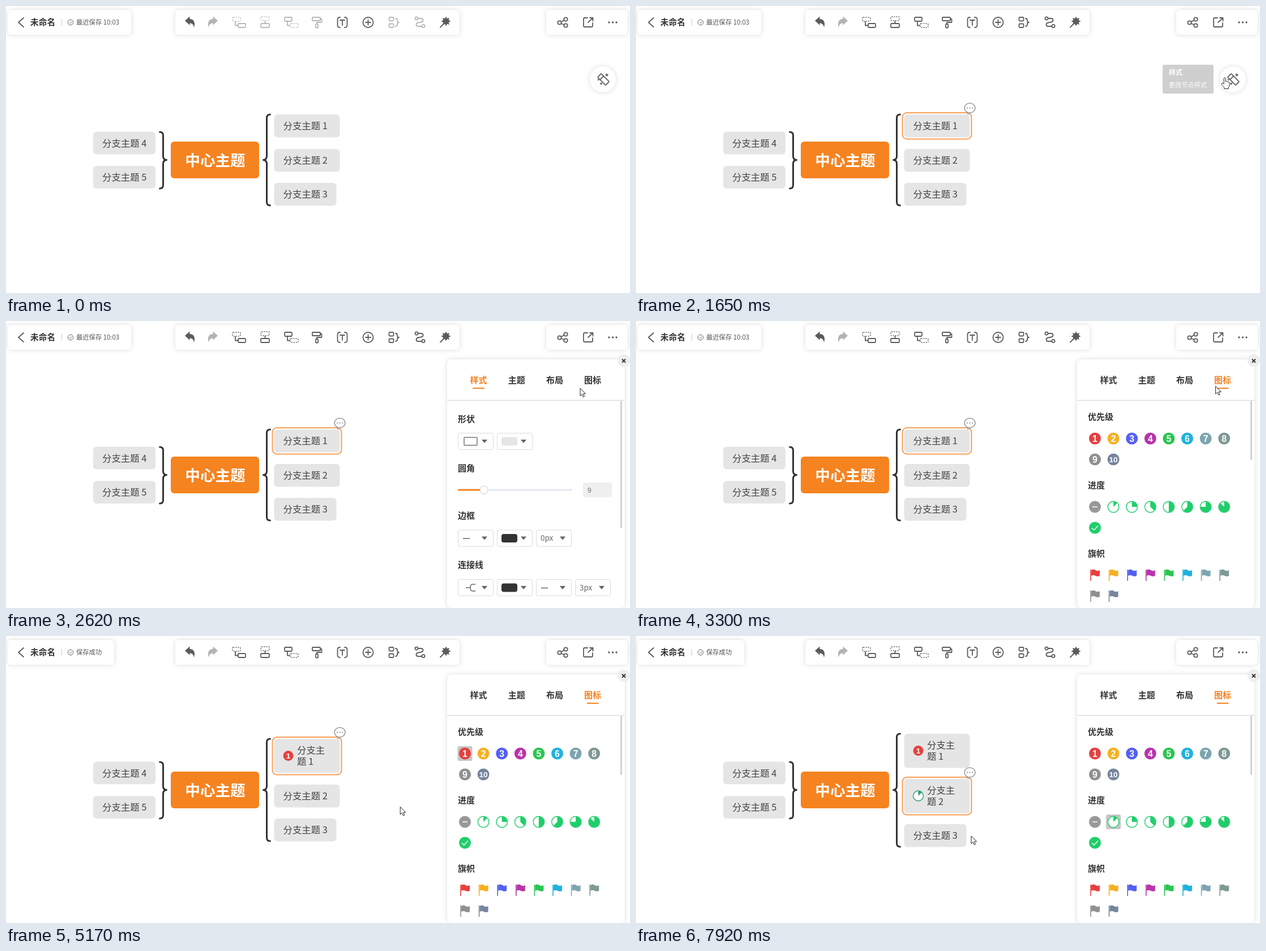
An HTML page that plays this animation: 1102x508 px, repeating every 7.99 s.

```html
<!DOCTYPE html>
<html lang="zh-CN">
<head>
<meta charset="utf-8">
<title>思维导图</title>
<style>
  html, body { margin: 0; width: 100%; height: 100%; overflow: hidden; background: #fff; }
  svg { display: block; font-family: "Noto Sans CJK SC", "Noto Sans CJK", sans-serif; }
  .card { fill: #fff; filter: drop-shadow(0 0 4px rgba(0, 0, 0, .14)); }
  .ico { fill: none; stroke: #5c5c5c; stroke-width: 1.8; stroke-linejoin: round; stroke-linecap: round; }
  .ico .dash { stroke-dasharray: 2 2; stroke-width: 1.5; stroke-linecap: butt; }
  .ico .solid { fill: #5c5c5c; stroke: none; }
  .idle .need { stroke: #b8b8b8; }
  .brace { fill: none; stroke: #333; stroke-width: 3; stroke-linecap: round; stroke-linejoin: round; }
  .num { font-family: "Liberation Sans", Arial, sans-serif; }
  .light { font-family: "Noto Sans CJK SC Light", "Noto Sans CJK SC DemiLight", "Noto Sans CJK SC", sans-serif; }
  .select { fill: #fff; stroke: #dcdcdc; }
</style>
</head>
<body>
<svg id="stage" width="1102" height="508" viewBox="0 0 1102 508"></svg>
<script>
const LOOP = 7990;
const ORANGE = '#f58320', GREEN = '#1fce6a';
const HUES = ['#e6403f', '#f6b021', '#5460f5', '#b834ab', '#2bc552', '#1fb2de',
              '#7ca5b0', '#7f9995', '#8f9191', '#75859d'];

// ---- drawing helpers ----
const text = (x, cy, size, str, fill = '#333', weight = 400, anchor = 'start', cls = '') =>
  `<text x="${x}" y="${cy + size * .37}" font-size="${size}" fill="${fill}" font-weight="${weight}" text-anchor="${anchor}" class="${cls}">${str}</text>`;
const rect = (x, y, w, h, r, attrs = '') =>
  `<rect x="${x}" y="${y}" width="${w}" height="${h}" rx="${r}" ${attrs}/>`;
const circle = (x, y, r, attrs = '') => `<circle cx="${x}" cy="${y}" r="${r}" ${attrs}/>`;
const path = (d, attrs = '') => `<path d="${d}" ${attrs}/>`;
const group = (id, body, attrs = '') => `<g id="${id}" ${attrs}>${body}</g>`;
const card = (x, w, id = 'bar' + x) => rect(x, 7, w, 44, 6, `class="card" id="${id}"`);

function star(x, y, r, points = 5, inner = .45) {
  const pts = [];
  for (let i = 0; i < points * 2; i++) {
    const a = i * Math.PI / points - Math.PI / 2, d = i % 2 ? r * inner : r;
    pts.push((x + d * Math.cos(a)).toFixed(1) + ' ' + (y + d * Math.sin(a)).toFixed(1));
  }
  return path('M' + pts.join('L') + 'Z', 'class="solid"');
}

function pie(x, y, r, eighths, color) {
  const a = eighths * Math.PI / 4, k = r - .5;
  return circle(x, y, r, `fill="#fff" stroke="${color}" stroke-width="1.4"`) +
    path(`M${x} ${y}V${y - k}A${k} ${k} 0 ${eighths > 4 ? 1 : 0} 1 ${x + k * Math.sin(a)} ${y - k * Math.cos(a)}Z`, `fill="${color}"`);
}

const badge = (x, y, r, n) => circle(x, y, r, `fill="${HUES[n - 1]}"`) +
  text(x, y, n > 9 ? r * 1.3 : r * 1.5, n, '#fff', 700, 'middle', 'num');

// side: 1 opens right, -1 opens left
function brace(x, top, bottom, side) {
  const e = 6 * side;
  return path(`M${x + e} ${top}Q${x} ${top} ${x} ${top + 6}V266Q${x} 272 ${x - e} 272.5Q${x} 273 ${x} 279V${bottom - 6}Q${x} ${bottom} ${x + e} ${bottom}`, 'class="brace"');
}

const box = (x, y, w, h) => rect(x, y, w, h, 6, 'fill="#e5e5e5"');
const label = (x, cy, str) => text(x, cy, 16.4, str, '#444', 300, 'start', 'light');

// ---- top bars ----
function topBar() {
  const undo = 'M316 26L324.500 18.500V23C331.500 23 335 29 332 38C331 32.500 329 30.500 324.500 30.500V34Z';
  const need = body => `<g class="need">${body}</g>`;
  const dashed = (x, y, w = 14) => rect(x, y, w, 7, 1.5, 'class="dash"');
  const solid = (x, y, w = 13) => rect(x, y, w, 7, 1.5);
  return card(3, 218, 'fileCard') +
    path('M31 21L22 29L31 37', 'class="ico"') +
    text(43, 28.5, 14.7, '未命名', '#333', 700) +
    path('M98.500 23V35', 'stroke="#ccc"') +
    circle(114, 29, 4.8, 'fill="none" stroke="#666"') +
    path('M111.700 29L113.500 30.800L116.500 27.500', 'fill="none" stroke="#666"') +
    group('saved0', text(124, 29, 11.3, '最近保存 10:03', '#555')) +
    group('saved1', text(124, 29, 11.3, '保存成功', '#555')) +
    card(299, 502) +
    path(undo, 'fill="#5c5c5c"') +
    path(undo, 'fill="#b3b3b3" transform="translate(690 0) scale(-1 1)"') +
    group('tools',
      need(dashed(400, 20) + solid(410, 31) + path('M405 28V34.500H409')) +
      need(dashed(450, 19, 15) + solid(450, 31, 15) + path('M457.500 27V30')) +
      need(solid(492, 20) + dashed(502, 31) + path('M497 28V34.500H501')) +
      need(rect(541, 20, 14, 6, 1) + path('M555 23H557.500V29H549V32') + rect(547, 32, 4, 6.5, 1)) +
      path('M590 20Q585.500 20 585.500 24V34Q585.500 38 590 38M598 20Q602.500 20 602.500 24V34Q602.500 38 598 38M590 25H598M594 25V34') +
      circle(639.5, 29, 9) + path('M635 29H644M639.500 24.500V33.500') +
      need(rect(676.5, 20, 8, 6.5, 1.5) + rect(676.5, 31.5, 8, 6.5, 1.5) + path('M688 22Q691 22 691 25.500Q691 29 694 29Q691 29 691 32.500Q691 36 688 36')) +
      need(circle(725, 22, 2.6) + circle(737, 35.5, 2.6) + path('M728 22H733Q736.500 22 736.500 25Q736.500 28 733 28.500L728 29.500Q724.500 30 724.500 33Q724.500 36 728 36H734')) +
      star(777, 27, 8.5, 8, .6) + path('M773 31.500L767 37.500'), 'class="ico"') +
    card(954, 144) +
    group('actions',
      circle(977.5, 29.5, 3.2) + circle(988.5, 23.5, 3.2) + circle(988.5, 34.5, 3.2) +
      path('M980.500 28L985.500 25M980.500 31L985.500 33') +
      path('M1027 21H1022Q1020 21 1020 23V35Q1020 37 1022 37H1034Q1036 37 1036 35V30M1031 21H1036.500V26.500M1036 21.500L1028 29') +
      [1065, 1071.5, 1078].map(x => circle(x, 29, 1.7, 'class="solid"')).join(''), 'class="ico"');
}

// ---- mind map; layout 0 plain, 1 first topic tagged, 2 second tagged too ----
const ROWS = [
  [[192, 40], [253, 40], [313, 40]],
  [[182, 60], [263, 40], [323, 40]],
  [[173, 60], [253, 60], [333, 40]]
];
function branches(layout) {
  const rows = ROWS[layout];
  let out = brace(460.5, rows[0][0], rows[2][0] + 40, 1);
  rows.forEach(([y, h], i) => {
    const cy = y + h / 2;
    out += box(473.5, y, i < 2 ? 116 : 110, h + .5);
    if (h === 40) return out += label(489.5, cy, `分支主题 ${i + 1}`);
    out += label(514, cy - 10, '分支主') + label(514, cy + 10, `题 ${i + 1}`);
    out += i ? pie(498.5, cy, 9, 1, '#2b9c7b') : badge(498.5, cy, 9, 1);
  });
  return out;
}
function outline(layout, i) {
  const [y, h] = ROWS[layout][i];
  const cy = y - 11.5;
  return rect(470.5, y - 3, 122, h + 6.5, 8, 'fill="none" stroke="#fa9d55" stroke-width="2"') +
    path(`M584 ${cy + 7}L586.500 ${cy + 11}L591 ${cy + 8}`, 'fill="#fff" stroke="#999" stroke-width="1.500"') +
    `<ellipse cx="589.500" cy="${cy}" rx="9.500" ry="8.500" fill="#fff" stroke="#999" stroke-width="1.600"/>` +
    [585, 589.5, 594].map(x => circle(x, cy, 1.1, 'fill="#888"')).join('');
}
const trunk = () =>
  box(154, 222.5, 110, 40) + box(154, 283, 110, 40) +
  label(170, 242.5, '分支主题 4') + label(170, 303, '分支主题 5') +
  brace(277.5, 223, 323, -1) + rect(291, 240, 156, 65, 6, `fill="${ORANGE}"`) +
  text(369.5, 273, 26.6, '中心主题', '#fff', 700, 'middle');

// ---- side panel ----
const TABS = ['样式', '主题', '布局', '图标'];
const cellX = i => 810.5 + 32.6 * (i % 8);
const heading = (cy, str) => text(798, cy, 15, str, '#333', 600);

function dropdown(x, cy, body) {
  return rect(x + .5, cy - 14.5, 62, 29, 3, 'class="select"') + body(x, cy) +
    path(`M${x + 42} ${cy - 3}H${x + 52}L${x + 47} ${cy + 3}Z`, 'fill="#606266"');
}
const swatch = color => (x, cy) => rect(x + 8, cy - 7.5, 28, 15, 4, `fill="${color}"`);
const line = (x, cy) => path(`M${x + 9} ${cy + .5}H${x + 21}`, 'stroke="#666" stroke-width="1.500"');
const px = n => (x, cy) => text(x + 8, cy, 13.5, n + 'px', '#666');
const frame = (x, cy) => rect(x + 11, cy - 7, 23, 14, 1, 'fill="none" stroke="#777" stroke-width="1.500"');
const link = (x, cy) => path(`M${x + 14} ${cy}H${x + 21}M${x + 31} ${cy - 6}H${x + 26}Q${x + 22} ${cy - 6} ${x + 22} ${cy}Q${x + 22} ${cy + 6} ${x + 26} ${cy + 6}H${x + 31}`, 'fill="none" stroke="#666" stroke-width="1.500"');
const dropdowns = (cy, list) => list.map((b, i) => dropdown(798 + 69 * i, cy, b)).join('');
const scroll = h => rect(1085, 141, 3, h, 1.5, 'fill="#d2d2d2"');

const stylePage = () =>
  heading(173, '形状') + dropdowns(213, [frame, swatch('#e5e5e5')]) +
  heading(260, '圆角') +
  rect(798, 297.5, 202, 3, 1.5, 'fill="#e4e7ed"') + rect(798, 297.5, 46, 3, 1.5, `fill="${ORANGE}"`) +
  circle(844, 299, 7, 'fill="#fff" stroke="#ccc"') +
  rect(1019, 286, 51, 26, 3, 'fill="#efefef"') + text(1027, 299.5, 12, '9', '#666') +
  heading(344, '边框') + dropdowns(384.5, [line, swatch('#333'), px(0)]) +
  heading(431, '连接线') + dropdowns(472, [link, swatch('#333'), line, px(3)]) + scroll(226);

function flag(x, y, color) {
  return path(`M${x - 7.5} ${y - 9}V${y + 11}`, `stroke="${color}" stroke-width="1.600"`) +
    path(`M${x - 6.5} ${y - 8}Q${x - 2.5} ${y - 10.5} ${x + 1} ${y - 8}T${x + 8.5} ${y - 8}V${y + 2}Q${x + 5} ${y + 4} ${x + 1} ${y + 2}T${x - 6.5} ${y + 2}Z`, `fill="${color}"`);
}
function iconPage() {
  let out = heading(169, '优先级') + heading(290, '进度') + heading(411, '旗帜') + scroll(105);
  out += rect(0, 0, 26, 26, 3, 'id="mark" fill="#c6c6c6"') + rect(0, 0, 26, 26, 3, 'id="hover" fill="#e3e3e3"');
  HUES.forEach((c, i) => {
    const low = i > 7 ? 37 : 0;
    out += badge(cellX(i), 208 + low, 10.5, i + 1) + flag(cellX(i), 449 + low, c);
  });
  out += circle(810.5, 329, 10.5, 'fill="#999"') + path('M806 329H815', 'stroke="#fff" stroke-width="1.500"');
  for (let i = 1; i < 8; i++) out += pie(cellX(i), 329, 9.8, i, GREEN);
  return out + circle(810.5, 366, 10.5, `fill="${GREEN}"`) +
    path('M805 366.500L809 370L816 362.500', 'fill="none" stroke="#fff" stroke-width="1.500"');
}
const tabBar = active => TABS.map((name, i) => {
  const x = 834.5 + 67.2 * i, on = i === active;
  return text(x, 104, 15, name, on ? ORANGE : '#333', 600, 'middle') +
    (on ? rect(x - 10.5, 118, 21, 2, 1, `fill="${ORANGE}"`) : '');
}).join('');
const panel = () =>
  rect(779, 68, 313.5, 440, 8, 'class="card"') +
  path('M779 140.500H1092', 'stroke="#dedede" stroke-width="1.500"') +
  group('tabs0', tabBar(0)) + group('tabs3', tabBar(3)) +
  group('page0', stylePage()) + group('page3', iconPage()) +
  circle(1091, 70, 11, 'fill="#eee"') +
  path('M1088 67.500L1094 73.500M1094 67.500L1088 73.500', 'stroke="#333" stroke-width="1.900"');

const styleButton = () =>
  circle(1054, 130, 23, 'class="card"') +
  group('wand', `<g transform="rotate(45 1055 130)">${rect(1045, 125.5, 20, 9, 1.5)}${path('M1051 125.500V134.500')}</g>` +
    star(1061, 122, 3.4) + star(1051, 137.5, 2.8) + star(1046, 130.5, 2), 'class="ico"');
const tooltip = () =>
  rect(930, 104, 90, 51, 3, 'fill="#333"') + text(941, 118, 12, '样式', '#fff', 700) +
  text(941, 140, 11.2, '更改节点样式', '#fff', 400);

const cursors = () =>
  path('M0 0V13.500L3.200 10.700L5.300 15.500L7.500 14.600L5.400 9.800H9.600Z', 'id="arrow" fill="#fff" stroke="#222"') +
  path('M-1.800 11V1.500A1.500 1.500 0 0 1 1.300 1.500V7A1.400 1.400 0 0 1 3.900 7.400A1.300 1.300 0 0 1 6.300 8.200A1.100 1.100 0 0 1 8 9.300V13Q8 15.500 6.300 17V19.500H-1V17.500Q-4 14.500 -5.700 11.500Q-6 9 -3.800 9.300Z', 'id="hand" fill="#fff" stroke="#222"');

document.getElementById('stage').innerHTML =
  topBar() + trunk() +
  [0, 1, 2].map(i => group('map' + i, branches(i))).join('') +
  group('pick0', outline(0, 0)) + group('pick1', outline(1, 0)) +
  group('pick2', outline(1, 1)) + group('pick3', outline(2, 1)) +
  group('button', styleButton()) + group('tip', tooltip()) +
  group('panel', panel()) + group('cursor', cursors());

// ---- timeline ----
const CLICK = { topic: 760, style: 2000, tab: 3100, priority: 4480, save: 4750, next: 5930, progress: 7110 };
const TICKS = [0, 200, 1160, 2000, 2060, 3100, 3860, 4750, 5510, 6360, 7110, 7640];
const ROUTE = [
  [200, 994, 456], [340, 850, 380], [550, 650, 262], [760, 566, 225], [1160, 566, 225],
  [1300, 640, 205], [1510, 920, 150], [1650, 1040, 127], [1930, 1045, 130], [2060, 1045, 130],
  [2270, 1043, 129], [2620, 1014, 119], [2760, 1031, 108], [2900, 1034, 105], [3170, 1034, 105],
  [3500, 985, 155], [3860, 905, 201], [4140, 853, 220], [4340, 815, 212], [4750, 812, 212],
  [5030, 740, 285], [5510, 590, 345], [5790, 568, 302], [5930, 559, 289], [6290, 559, 289],
  [6360, 611, 292], [6570, 740, 315], [6840, 854, 334], [6910, 851, 333], [7570, 851, 333],
  [7640, 810, 336], [7780, 680, 348], [7920, 592, 354]
];
const $ = {};
document.querySelectorAll('[id]').forEach(el => $[el.id] = el);
const show = (id, on) => { $[id].style.display = on ? '' : 'none'; };
const place = (id, x, y) => $[id].setAttribute('transform', `translate(${x} ${y})`);
const clamp = v => Math.max(0, Math.min(1, v));

function step(t) {
  const base = TICKS.filter(v => v <= t).pop();
  return base + Math.floor((t - base) / 70) * 70;
}
function pointer(t) {
  const i = ROUTE.findIndex(p => p[0] > t);
  if (i < 0) return ROUTE[ROUTE.length - 1].slice(1);
  if (i === 0) return ROUTE[0].slice(1);
  const [t0, x0, y0] = ROUTE[i - 1], [t1, x1, y1] = ROUTE[i];
  const k = (t - t0) / (t1 - t0);
  return [x0 + (x1 - x0) * k, y0 + (y1 - y0) * k];
}
function hitIcon(x, y) {
  const row = [208, 329].find(r => Math.abs(y - r) <= 13);
  const i = Math.round((x - 810.5) / 32.6);
  return row && i >= 0 && i < 8 && Math.abs(x - cellX(i)) <= 13 ? [cellX(i), row] : null;
}

function render(t) {
  const at = name => t >= CLICK[name];
  const layout = at('progress') ? 2 : at('priority') ? 1 : 0;
  const picked = !at('topic') ? -1 : layout === 2 ? 3 : at('next') ? 2 : layout;
  for (let i = 0; i < 3; i++) show('map' + i, i === layout);
  for (let i = 0; i < 4; i++) show('pick' + i, i === picked);

  $.tools.classList.toggle('idle', !at('topic'));
  show('saved0', !at('save'));
  show('saved1', at('save'));
  $.fileCard.setAttribute('width', at('save') ? 188 : 218);

  const [x, y] = pointer(t);
  const onButton = !at('style') && Math.hypot(x - 1054, y - 130) < 23;
  const onTab = at('style') && Math.abs(x - 1036) < 17 && Math.abs(y - 104) < 11;
  const icon = at('tab') && hitIcon(x, y);
  show('button', !at('style'));
  show('tip', onButton);
  $.tip.style.opacity = clamp(.23 + (t - 1650) / 180);

  const slide = 1 - Math.pow(1 - clamp((t - 2130) / 490), 3);
  show('panel', at('style'));
  place('panel', (1 - slide) * 334, 0);
  show('tabs0', !at('tab'));
  show('page0', !at('tab'));
  show('tabs3', at('tab'));
  show('page3', at('tab'));

  const mark = layout === 2 ? [cellX(1), 329] : layout === 1 && !at('next') ? [cellX(0), 208] : null;
  show('mark', mark);
  if (mark) place('mark', mark[0] - 13, mark[1] - 13);
  show('hover', icon && !(mark && mark[0] === icon[0] && mark[1] === icon[1]));
  if (icon) place('hover', icon[0] - 13, icon[1] - 13);

  const hand = !!(onButton || onTab || icon);
  show('cursor', t >= 200);
  show('hand', hand);
  show('arrow', !hand);
  place('cursor', x, y);
}

const start = performance.now();
function loop() {
  render(step((performance.now() - start) % LOOP));
  requestAnimationFrame(loop);
}
loop();
</script>
</body>
</html>
```
